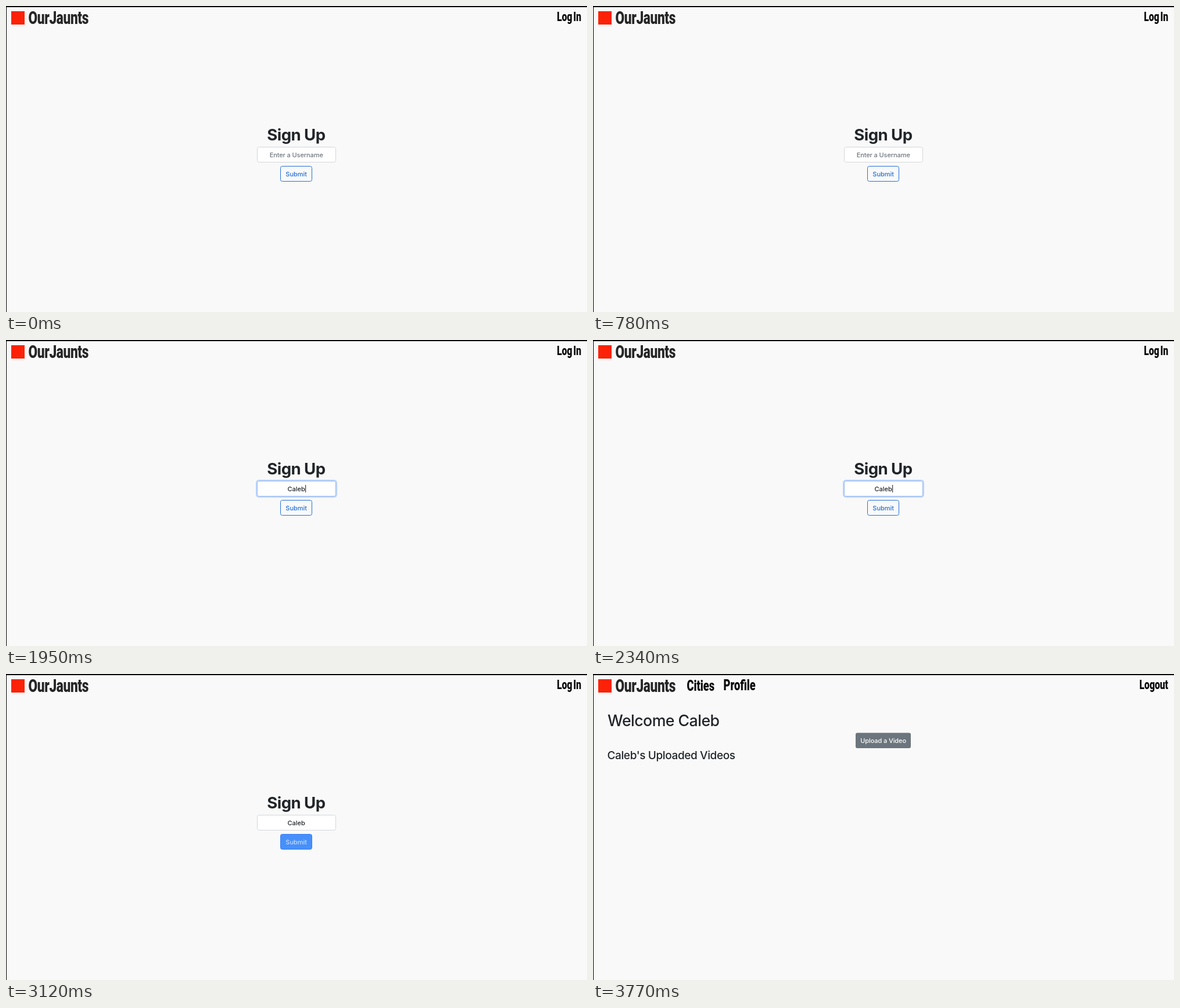
Write an HTML page that moves like this. It is 1000 px wide and 528 px high and loops after 5.72 s.

```html
<!DOCTYPE html>
<html lang="en">
<meta charset="utf-8">
<title>Sign up</title>
<style>
  html, body { margin: 0; height: 100%; overflow: hidden; background: #f9f9f9 }
  svg { display: block; width: 100%; height: 100% }
  text { font: 450 11px Inter, "Open Sans", sans-serif; fill: #212529; white-space: pre }
  .mid { text-anchor: middle }
  .small { letter-spacing: -.1px }
  .nav text { font: 800 25px Roboto, "Liberation Sans", sans-serif; fill: #080808 }
  .nav .brand { font-size: 31px; fill: #262626; letter-spacing: -.015em }
  .nav .right { font-size: 21.5px; text-anchor: end; word-spacing: -.13em }
  .title { font-weight: 700; font-size: 27.6px; letter-spacing: -.6px }
  .hello { font-weight: 500; font-size: 26.7px; letter-spacing: -.02em }
  .list { font-weight: 500; font-size: 19px; letter-spacing: -.02em }
  .ring { fill: none; stroke: #0d6efd; stroke-opacity: .25; stroke-width: 2.5 }
</style>
<svg viewBox="0 0 1000 528">
  <rect width="1000" height="528" fill="#f9f9f9"/>
  <path d="M0 0H1000V2H1V528H0z"/>
  <rect x="9" y="9" width="23" height="23" fill="#fb2208"/>
  <g class="nav">
    <text class="brand" transform="translate(38.5 31) scale(.73 1)">OurJaunts</text>
    <g id="links">
      <text transform="translate(161.5 29) scale(.73 1)">Cities</text>
      <text transform="translate(224.5 28) scale(.73 1)">Profile</text>
    </g>
    <text id="account" class="right" transform="translate(990 26) scale(.73 1)"></text>
  </g>

  <g id="form">
    <text class="title mid" x="499.4" y="232.4">Sign Up</text>
    <rect id="fieldRing" class="ring" x="431.2" y="242.2" width="137.6" height="28.6" rx="4"/>
    <rect id="field" x="432.5" y="243.5" width="135" height="26" rx="3" fill="#fff"/>
    <text id="entry" class="mid" x="499.7" y="260.5"></text>
    <rect id="caret" y="250" width="1" height="13" fill="#111"/>
    <rect id="buttonRing" class="ring" x="471.2" y="275.2" width="56.6" height="28.6" rx="4"/>
    <rect id="button" x="472.5" y="276.5" width="54" height="26" rx="3" fill="#0d6efd" stroke="#2470da"/>
    <text id="submit" class="mid" x="499.7" y="294">Submit</text>
  </g>

  <g id="profile">
    <text id="hello" class="hello" x="25" y="90"></text>
    <rect x="452" y="101.5" width="95" height="26.5" rx="3" fill="#6c757d"/>
    <text class="mid small" x="499.6" y="119" style="fill:#fff">Upload a Video</text>
    <text id="list" class="list" x="24.5" y="147"></text>
  </g>
</svg>
<script>
  const STEP = 130, LOOP = 5720, NAME = "Caleb";
  const $ = id => document.getElementById(id);
  const clamp = v => Math.max(0, Math.min(1, v));
  const show = (id, on) => $(id).style.display = on ? "" : "none";
  const mix = (a, b, k) => `color-mix(in srgb, ${b} ${k * 100}%, ${a})`;

  $("hello").textContent = "Welcome " + NAME;
  $("list").textContent = NAME + "'s Uploaded Videos";

  function draw(step) {
    const signedIn = step >= 29;
    show("form", !signedIn);
    show("profile", signedIn);
    show("links", signedIn);
    $("account").textContent = signedIn ? "Logout" : "Log In";
    if (signedIn) return;

    const focus = clamp((step - 7) / 2) * clamp((21 - step) / 2);
    const hover = clamp((step - 23) * .75);
    const pressed = clamp((step - 25) / 2);
    const typed = Math.round(clamp((step - 11) / 4) * NAME.length);

    const entry = $("entry");
    entry.textContent = typed ? NAME.slice(0, typed) : "Enter a Username";
    entry.setAttribute("class", typed ? "mid" : "mid small");
    entry.style.fill = typed ? "#212529" : "#70777d";
    show("caret", typed && step < 19);
    if (typed) $("caret").setAttribute("x", 500 + entry.getComputedTextLength() / 2);

    $("fieldRing").style.opacity = focus;
    $("field").style.stroke = mix("#d2d6da", "#96b8ee", focus);
    $("button").style.fillOpacity = hover;
    $("button").style.stroke = mix("#2470da", "#3c83fb", hover);
    $("buttonRing").style.opacity = pressed;
    $("submit").style.fill = mix("#2470da", "#fff", hover);
  }

  const start = performance.now();
  function tick() {
    draw(Math.floor((performance.now() - start) % LOOP / STEP));
    requestAnimationFrame(tick);
  }
  tick();
</script>
</html>
```
